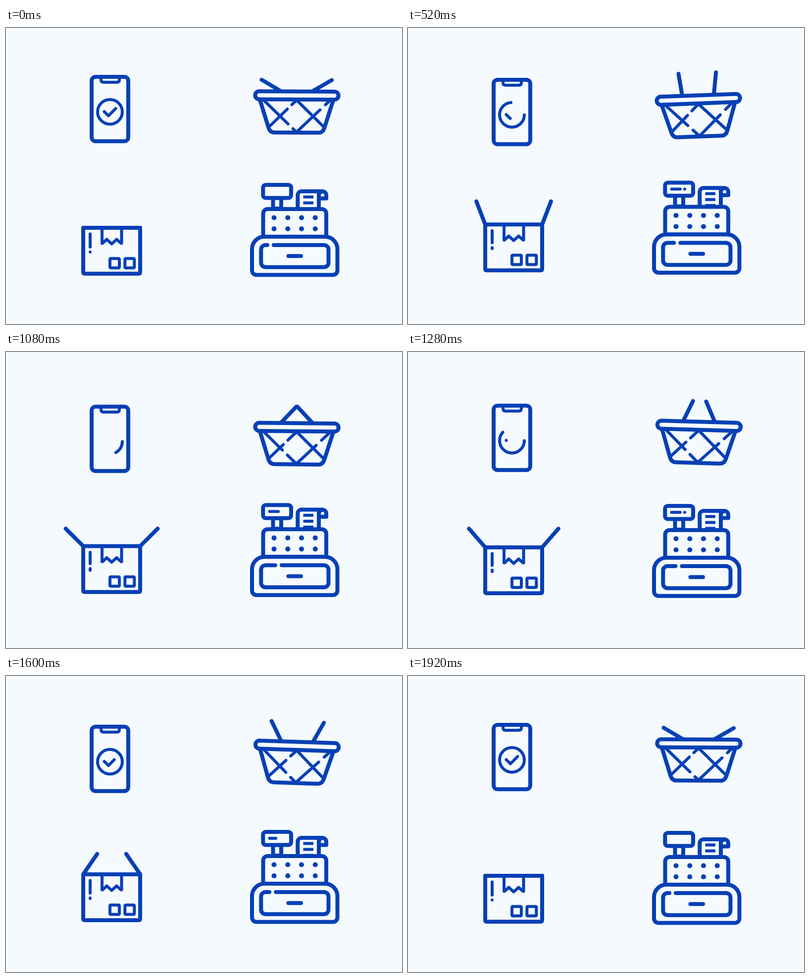
An HTML page for the animation above (1960 ms loop, 800 by 600 pixels).

```html
<!DOCTYPE html>
<html lang="en">
<head>
<meta charset="utf-8">
<title>Shopping icons</title>
<style>
  html, body { margin: 0; width: 100%; height: 100%; overflow: hidden; background: #f5faff; }
  svg { display: block; width: 800px; height: 600px; }
  .ink { fill: none; stroke: #0640b5; stroke-width: 8; stroke-linecap: round; stroke-linejoin: round; }
  .thin { stroke-width: 6; }
  .flat { stroke-linecap: butt; }
  .solid { fill: #f5faff; }
  .dots { fill: #0640b5; stroke: none; }
</style>
</head>
<body>
<svg viewBox="0 0 800 600" class="ink">
  <g id="phone">
    <rect x="173" y="99" width="74" height="130.5" rx="8"/>
    <g class="thin">
      <path d="M192 101v4q0 5 5 5h27q5 0 5-5v-4"/>
      <circle id="ring" cx="210" cy="170" r="25" pathLength="1"/>
      <path id="tick" d="M198.5 169.5L207 177.8L221.5 163.2" pathLength="1"/>
    </g>
  </g>

  <g id="basket">
    <path id="handleL" d="M555 128v-45"/>
    <path id="handleR" d="M619 128v-45"/>
    <g class="thin">
      <path id="weaveA" d="M520 146L587 211"/>
      <path id="weaveB" d="M532 200L587 146"/>
      <path d="M587 146L642 200"/>
      <path id="weaveC" d="M587 211L654 147"/>
    </g>
    <path d="M513 146L530.5 202q3 10 12 10H631.5q9 0 12-10L661 146"/>
    <rect class="solid" x="503.2" y="128.5" width="168.4" height="16.4" rx="8.2"/>
  </g>

  <g id="box">
    <path id="flapL" d="M156 405v-50"/>
    <path id="flapR" d="M271 405v-50"/>
    <path d="M156 405H271V495q0 3-3 3H159q-3 0-3-3Z"/>
    <g class="thin">
      <path d="M194 405V436.5H195L203.5 428.5L213.5 437.5L223.5 428.5L232.5 436.5H233.5V405"/>
      <path id="mark" d="M170 417.5V454"/>
      <rect x="210" y="467.3" width="19" height="19" rx="1.5"/>
      <rect x="240.3" y="467.3" width="19" height="19" rx="1.5"/>
    </g>
  </g>

  <g id="till">
    <g id="paper">
      <path d="M589.3 376V339a8 8 0 0 1 8-8H639a8 8 0 0 1 8 8V345.5H632M632 376V331M632 339.5a8 8 0 0 1 8-8"/>
      <path class="thin flat" d="M600.5 342.5h20.5m-20.5 12h20.5m-20.5 12h20.5"/>
    </g>
    <path d="M539.5 344.5V366H556V344.5Z"/>
    <rect class="solid" x="519.3" y="318" width="56.7" height="26.5" rx="5.5"/>
    <path id="text" class="thin" d="M532.5 331H550" pathLength="1"/>
    <circle id="stop" class="dots" cx="559" cy="331" r="3"/>
    <path class="solid" d="M519.5 423V376a9 9 0 0 1 9-9H638a9 9 0 0 1 9 9V423Z"/>
    <g id="keys" class="dots"></g>
    <path class="solid" d="M497 448a25 25 0 0 1 25-25H644.5a25 25 0 0 1 25 25V491.5a9 9 0 0 1-9 9H506a9 9 0 0 1-9-9Z"/>
    <path id="drawer" d="M524.5 440H642.5a9 9 0 0 1 9 9V475.7a9 9 0 0 1-9 9H524.3a9 9 0 0 1-9-9V449a9 9 0 0 1 9-9Z"/>
    <path d="M570.5 462.3H596"/>
  </g>
</svg>
<script>
const STEP = 40, STEPS = 49, CYCLE = 1920, LAG = 40;
const $ = id => document.getElementById(id);
const ease = u => (1 - Math.cos(Math.PI * Math.min(1, Math.max(0, u)))) / 2;
const ramp = (t, from, to) => ease((t - from) / (to - from));
const angle = t => 2 * Math.PI * t / CYCLE;
const wave = t => (1 - Math.cos(angle(t))) / 2;

const set = (id, name, value) => $(id).setAttribute(name, value);
const lift = (id, y) => set(id, "transform", `translate(0 ${y})`);
const turn = (id, deg, x, y) => set(id, "transform", `rotate(${deg} ${x} ${y})`);
const show = (id, on) => set(id, "visibility", on ? "visible" : "hidden");
const gap = (id, start, size) => set(id, "stroke-dasharray", `${start} ${size} 500`);

function trim(id, part) {
  show(id, part > 0.002);
  set(id, "stroke-dasharray", part > 0.998 ? "none" : `${part} 2`);
}

for (const y of [384.5, 407])
  for (let i = 0; i < 4; i++)
    $("keys").innerHTML += `<circle cx="${541.5 + i * 27.75}" cy="${y}" r="5.1"/>`;

function drawPhone(t, late) {
  lift("phone", 12 * late);
  trim("ring", t < 840 ? 1 - ramp(t, 400, 750) : ramp(t, 900, 1560));
  trim("tick", t < 840 ? 1 - ramp(t, 340, 640) : ramp(t, 1260, 1700));
}

function drawBasket(t, late) {
  const tilt = -2.1 * Math.sin(angle(t - LAG));
  set("basket", "transform", `translate(0 ${16 * late}) rotate(${tilt} 587.3 157)`);
  const swing = 105 * late - 60;
  turn("handleL", swing, 555, 128);
  turn("handleR", -swing, 619, 128);
  gap("weaveA", 69.6 - 16 * late, 14);
  gap("weaveB", 51 - 11.5 * late, 12.8);
  gap("weaveC", 65.7 - 11 * late, 15);
}

function drawBox(t, bob) {
  lift("box", -12 * bob);
  const open = 90 - 135 * ramp(Math.min(t, CYCLE - t), 0, 720);
  turn("flapL", open, 156, 405);
  turn("flapR", -open, 271, 405);
  gap("mark", 26.5 - 3.5 * bob, 9.9);
}

function drawTill(t, bob) {
  lift("till", -8 * bob);
  lift("paper", -4 * bob);
  gap("drawer", 3.5 + 16.5 * bob, 13);
  trim("text", t < 960 ? ramp(t, 0, 280) : 1 - ramp(t, 1500, 1780));
  show("stop", (t >= 280 && t < 960) || (t >= 1240 && t < 1500));
}

function draw(now) {
  const t = Math.floor(now / STEP) % STEPS * STEP;
  const bob = wave(t), late = wave(t - LAG);
  drawPhone(t, late);
  drawBasket(t, late);
  drawBox(t, bob);
  drawTill(t, bob);
  requestAnimationFrame(draw);
}
draw(performance.now());
</script>
</body>
</html>
```
